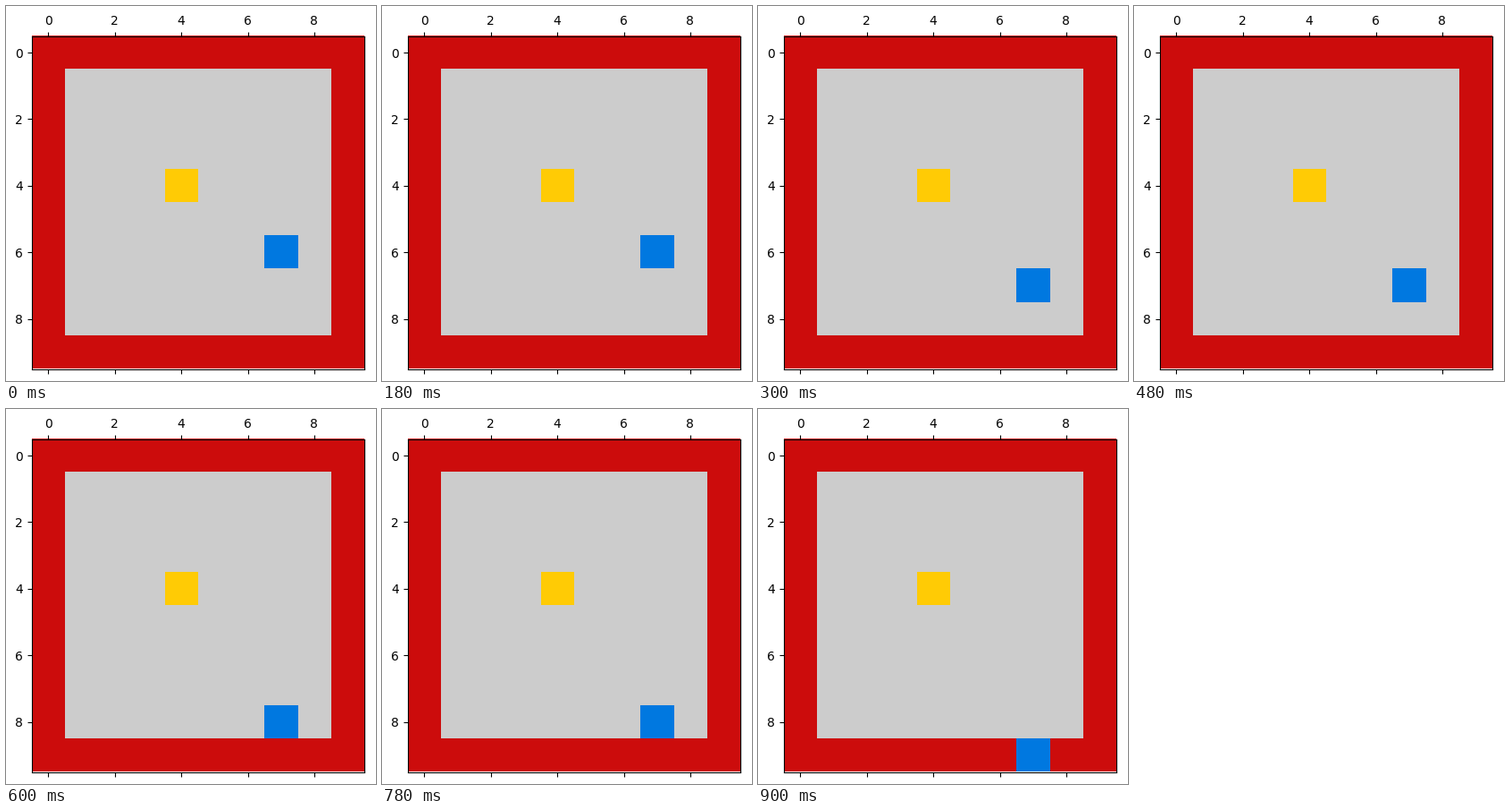
A matplotlib script that plays this animation: 414x419 px, repeating every 1.2 s.

```python
import numpy as np
import matplotlib.pyplot as plt
from matplotlib.animation import FuncAnimation
from matplotlib.colors import ListedColormap

W, H, DPI = 414, 419, 100
SIZE, FRAMES = 10, 4
FLOOR, WALL, GOAL, PLAYER = range(4)
COLORS = ["#cccccc", "#cc0c0c", "#ffcb05", "#0078e0"]

plt.rcParams["font.family"] = "DejaVu Sans"

# the tiny margin keeps float rounding from losing a pixel
fig = plt.figure(figsize=((W + 1e-6) / DPI, (H + 1e-6) / DPI), dpi=DPI)
side = 372 - 1e-3
ax = fig.add_axes((28.72 / W, 13.45 / H, side / W, side / H))


def board(step):
    grid = np.full((SIZE, SIZE), WALL)
    grid[1:-1, 1:-1] = FLOOR
    grid[4, 4] = GOAL
    grid[6 + step, 7] = PLAYER
    return grid


image = ax.matshow(board(0), cmap=ListedColormap(COLORS), vmin=0, vmax=3,
                   interpolation="nearest")

# the frame sits a hair below the grid, so they round to different pixel rows
nudge = 0.003
ax.set_ylim(SIZE - 0.5 + nudge, -0.5 + nudge)
image.set_clip_on(False)


def update(step):
    image.set_data(board(step))
    return [image]


anim = FuncAnimation(fig, update, frames=FRAMES, interval=300,
                     repeat=True, repeat_delay=0, blit=False)
plt.show()
```
